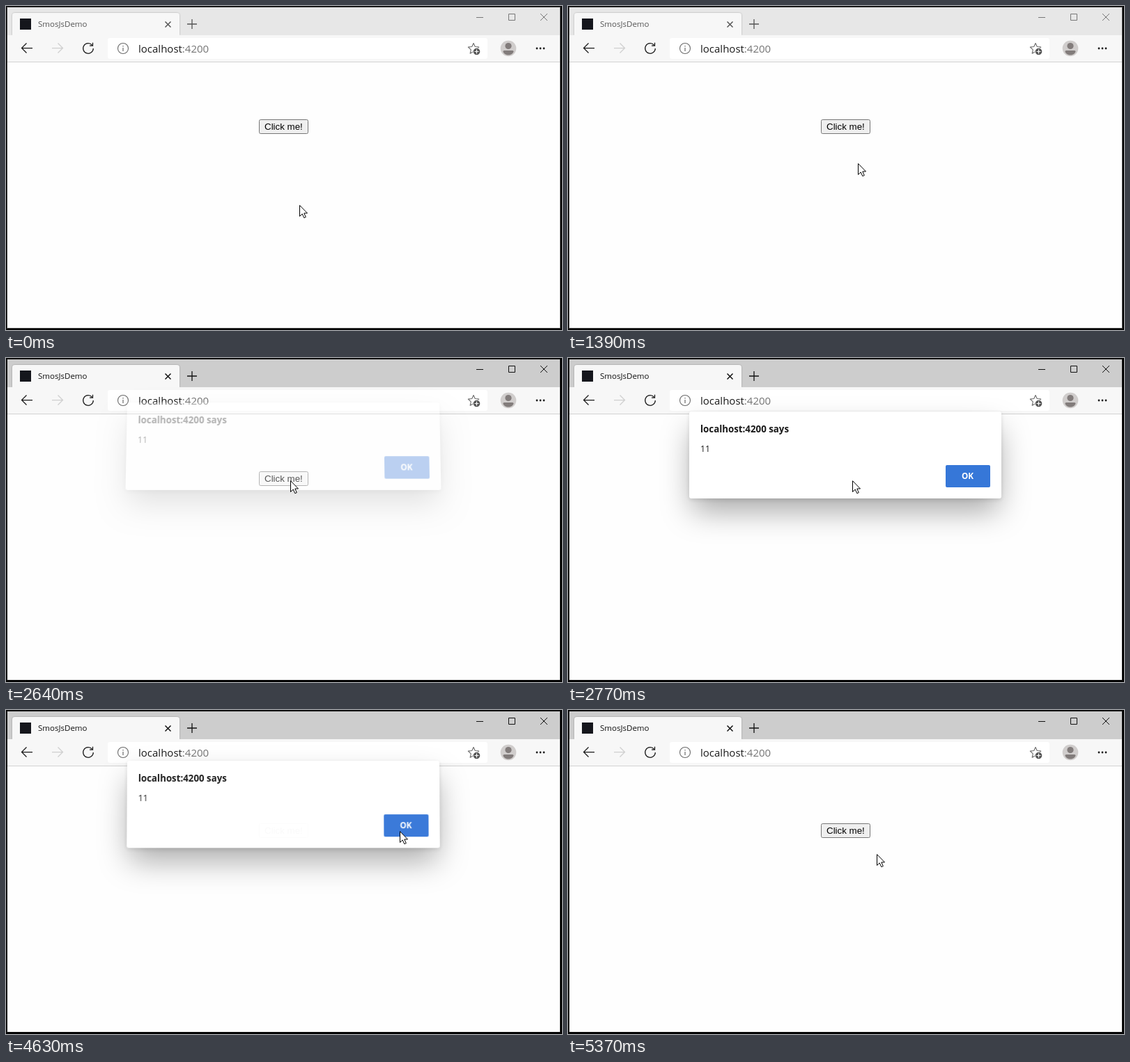
Recreate the animation shown at these times as an HTML page. Size 798 by 466 pixels, loop 7000 ms.

```html
<!DOCTYPE html>
<html lang="en">
<head>
<meta charset="utf-8">
<title>SmosJsDemo</title>
<style>
  html, body { margin: 0; width: 100%; height: 100%; overflow: hidden; background: #000; }
  #stage { position: relative; width: 798px; height: 466px; overflow: hidden; }
  svg { position: absolute; left: 0; top: 0; overflow: visible; }
  text { font-family: "Open Sans", "Noto Sans", sans-serif; white-space: pre; }
  .line { fill: none; stroke: currentColor; }

  #bar, #edge, #controls, #tab, #button, #dialog { animation: 7s step-end infinite; }
  #bar { animation-name: bar; }
  #edge { color: #444; animation-name: ink; }
  #controls { color: #777; animation-name: ink; }
  #tab { color: #555; animation-name: ink; }
  #button { animation-name: button; }

  #dialog {
    position: absolute; left: 174px; top: 77px; width: 448px; height: 125px;
    background: #fff; border-radius: 3px; opacity: 0;
    box-shadow: 0 22px 44px -4px rgba(0, 0, 0, .34), 0 2px 6px rgba(0, 0, 0, .12);
    transform-origin: 50% 0; animation-name: dialog;
  }
  #cursor { left: 421px; top: 286px; animation: cursor 7s linear infinite; }

  @keyframes bar { 0% { fill: #e7e7e7; } 35.143%, 100% { fill: #cdcdcd; } }
  @keyframes ink { 35.143%, 100% { color: #111; } }
  @keyframes button {
    0% { fill: #efefef; stroke: #767676; }
    26% { fill: #e5e5e5; stroke: #4f4f4f; }
    35.143% { fill: #f5f5f5; stroke: #8d8d8d; }
    56.286%, 100% { fill: #efefef; stroke: #767676; }
  }
  /* Opens by tilting down into place, closes by tilting back up. */
  @keyframes dialog {
    0% { opacity: 0; transform: none; }
    37.286% { opacity: .1; transform: translateY(-17px) perspective(1000px) rotateX(6.5deg); }
    37.714% { opacity: .34; transform: translateY(-13px) perspective(1000px) rotateX(5deg); }
    38.143% { opacity: .66; transform: translateY(-8px) perspective(1000px) rotateX(3deg); }
    38.857% { opacity: .93; transform: translateY(-3px) perspective(1000px) rotateX(1.1deg); }
    39.571% { opacity: 1; transform: none; }
    66.143% { opacity: .98; transform: translateY(-4px) perspective(1000px) rotateX(1.5deg); }
    66.857% { opacity: .68; transform: translateY(-9px) perspective(1000px) rotateX(3.5deg); }
    67.429% { opacity: .34; transform: translateY(-14px) perspective(1000px) rotateX(5.3deg); }
    68% { opacity: .1; transform: translateY(-18px) perspective(1000px) rotateX(7deg); }
    68.714%, 100% { opacity: 0; transform: none; }
  }
  @keyframes cursor {
    0% { left: 421px; top: 286px; }
    14.471% { left: 421px; top: 286px; animation-timing-function: steps(8, end); }
    19.857% { left: 416px; top: 226px; animation-timing-function: steps(7, end); }
    24.571% { left: 410px; top: 188px; animation-timing-function: steps(4, end); }
    27.429% { left: 408px; top: 179px; }
    29% { left: 408px; top: 179px; animation-timing-function: steps(2, end); }
    30.429% { left: 408px; top: 176px; animation-timing-function: step-end; }
    56.286% { left: 428px; top: 176px; animation-timing-function: steps(13, end); }
    65.429% { left: 565px; top: 174px; }
    71.657% { left: 565px; top: 174px; animation-timing-function: steps(8, end); }
    76.714% { left: 443px; top: 207px; animation-timing-function: step-end; }
    100% { left: 421px; top: 286px; }
  }
</style>
</head>
<body>
<div id="stage">
  <svg width="798" height="466">
    <defs>
      <filter id="soft" x="-5%" y="-20%" width="110%" height="140%">
        <feDropShadow dx="0" dy="0" stdDeviation="1.3" flood-opacity=".28"/>
      </filter>
    </defs>
    <rect x="2" y="2" width="793" height="461" fill="#fefefe"/>
    <rect id="bar" x="2" y="2" width="793" height="40"/>

    <path d="M9 42V14a4 4 0 0 1 4-4H245a4 4 0 0 1 4 4V42Z" fill="#f7f7f7" filter="url(#soft)"/>
    <rect x="2" y="42" width="793" height="38" fill="#f7f7f7"/>
    <rect x="2" y="80" width="793" height="1" fill="#d2d2d2"/>
    <rect id="edge" class="line" x="1.5" y="1.5" width="794" height="462"/>

    <g id="tab">
      <rect x="20" y="18" width="16" height="16" fill="#15161c"/>
      <text x="46" y="30" font-size="11.5" fill="currentColor">SmosJsDemo</text>
      <path class="line" stroke-width="1.5" d="M228.5 22.5l8 8m0-8l-8 8"/>
      <path class="line" stroke-width="1.3" d="M260 26h14M267 19v14"/>
    </g>
    <g id="controls" class="line">
      <path d="M675 16.5h10M721.5 11.5h9v9h-9zM767 11l10 10m0-10l-10 10"/>
    </g>

    <g class="line" color="#1b1b1b" stroke-width="1.25">
      <path d="M38 60.500H22.500M29.500 53.500l-7 7 7 7"/>
      <path d="M66 60.500H81.500M74.500 53.500l7 7-7 7" stroke="#cfcfcf"/>
      <path d="M125.300 61A7.300 7.300 0 1 1 123.600 56.300M124.500 52.800V57.200H120"/>
    </g>

    <rect x="146" y="46" width="545" height="30" rx="3" fill="#fff"/>
    <g color="#6a6a6a">
      <circle class="line" cx="168" cy="61" r="7.5" stroke-width="1.1"/>
      <path class="line" stroke-width="1.2" d="M168 60v5M168 57v1.5"/>
      <path class="line" stroke-width="1.1" stroke-linejoin="round"
        d="M671 53.500l2.300 5 5.400.6-4 3.700 1.100 5.400-4.800-2.700-4.800 2.700 1.100-5.400-4-3.700 5.400-.6z"/>
    </g>
    <circle cx="675.5" cy="65.5" r="5.2" fill="#555" stroke="#fff"/>
    <path d="M672.5 65.5h6M675.5 62.5v6" stroke="#fff" stroke-width="1.2"/>
    <text x="190" y="67" font-size="15" fill="#1b1b1b">localhost<tspan fill="#757575">:4200</tspan></text>

    <circle cx="721" cy="61" r="11.3" fill="#d0cdcc"/>
    <circle cx="721" cy="57.5" r="4.6" fill="#827c7b"/>
    <path d="M713.5 65.5q0-1.500 1.500-1.500h12q1.500 0 1.500 1.500c-1 3.500-4 5-7.500 5s-6.500-1.500-7.500-5z" fill="#827c7b"/>
    <g fill="#1b1b1b">
      <circle cx="762" cy="61" r="1.4"/><circle cx="767" cy="61" r="1.4"/><circle cx="772" cy="61" r="1.4"/>
    </g>

    <rect id="button" x="363.5" y="163.5" width="70" height="20" rx="2"/>
    <text x="371" y="178" font-size="13.333" style="font-family: 'Liberation Sans', Arial, sans-serif">Click me!</text>
  </svg>

  <div id="dialog">
    <svg width="448" height="125">
      <text x="16" y="30" font-size="13.3" font-weight="700" fill="#1b1b1b">localhost:4200 says</text>
      <text x="16" y="58" font-size="12.3" fill="#1b1b1b">11</text>
      <rect x="368" y="77" width="64" height="32" rx="2" fill="#3677d8"/>
      <text x="399.5" y="97" font-size="11.7" font-weight="700" fill="#fff" text-anchor="middle">OK</text>
    </svg>
  </div>

  <svg id="cursor" width="12" height="20">
    <path d="M.5.7V16.500L4.200 13 6.800 18.700 9.300 17.600 6.800 12H11.500Z" fill="#fff" stroke="#000"/>
  </svg>
</div>
</body>
</html>
```
